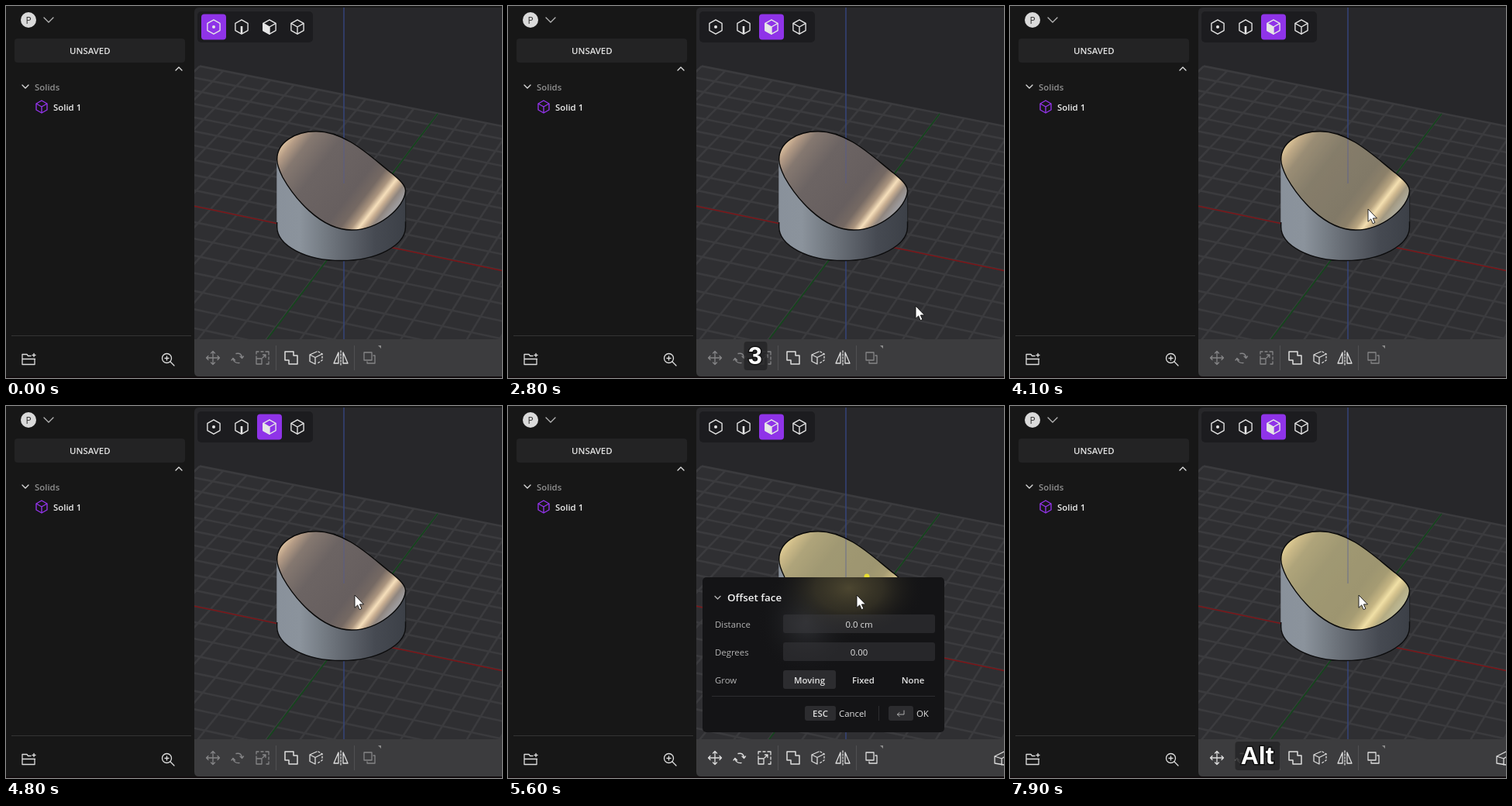
These frames come from a looping animation (640 px wide and 480 px high, 8 s). An HTML page:

```html
<!DOCTYPE html>
<html lang="en">
<head>
<meta charset="utf-8">
<title>Offset face</title>
<style>
html, body { margin: 0; width: 100%; height: 100%; overflow: hidden; background: #171717; }
svg { display: block; width: 640px; height: 480px; }
text { font-family: "Open Sans", "Noto Sans", sans-serif; font-size: 11.4px; fill: #e2e2e2; }
.semi { font-weight: 600; }
.mid { text-anchor: middle; }
.dim { fill: #b4b4b4; }
.line { fill: none; stroke: #dedede; stroke-width: 1.3; stroke-linejoin: round; stroke-linecap: round; }
.key { font: bold 32px "Liberation Sans", Arial, sans-serif; fill: #fff; stroke: #111; stroke-width: 3; paint-order: stroke; }
</style>
</head>
<body>
<svg viewBox="0 0 640 480">
  <defs>
    <clipPath id="view"><path d="M640 2H249Q243 2 243 8V430H640Z"/></clipPath>
    <linearGradient id="side" gradientUnits="userSpaceOnUse" x1="349" x2="516" y1="0" y2="0">
      <stop offset="0" stop-color="#89919b"/><stop offset=".18" stop-color="#8b939c"/>
      <stop offset=".36" stop-color="#757c84"/><stop offset=".58" stop-color="#5b6068"/>
      <stop offset=".76" stop-color="#464a52"/><stop offset="1" stop-color="#3c4047"/>
    </linearGradient>
    <linearGradient id="top" gradientUnits="userSpaceOnUse" x1="349" y1="187" x2="480" y2="288">
      <stop offset="0" stop-color="#e0c4a0"/><stop offset=".06" stop-color="#b59c86"/>
      <stop offset=".15" stop-color="#857870"/><stop offset=".34" stop-color="#6c6463"/>
      <stop offset=".66" stop-color="#675f5f"/><stop offset=".76" stop-color="#756963"/>
      <stop offset=".83" stop-color="#ab957f"/><stop offset=".875" stop-color="#f6dfbb"/>
      <stop offset=".91" stop-color="#c8ae91"/><stop offset=".95" stop-color="#90867f"/>
      <stop offset="1" stop-color="#9c9a9c"/>
    </linearGradient>
    <radialGradient id="warm"><stop offset="0" stop-color="#4c4630"/><stop offset=".45" stop-color="#3a3627" stop-opacity=".75"/><stop offset="1" stop-color="#141416" stop-opacity="0"/></radialGradient>
    <radialGradient id="cool"><stop offset="0" stop-color="#3c3e42" stop-opacity=".7"/><stop offset="1" stop-color="#141416" stop-opacity="0"/></radialGradient>
    <clipPath id="card"><rect x="251" y="221" width="312" height="200" rx="5"/></clipPath>
  </defs>

  <rect width="640" height="480" fill="#171717"/>
  <rect y="478" width="640" height="2" fill="#120c0e"/>

  <!-- sidebar -->
  <circle cx="29" cy="18" r="10" fill="#dadada"/>
  <text class="mid" x="29" y="22.5" style="font-size:12px;fill:#333">P</text>
  <path class="line" stroke-opacity=".8" d="M49 15l6 6 6-6"/>
  <rect x="11" y="42" width="220" height="31" rx="4" fill="#232324"/>
  <text class="semi" x="82" y="62">UNSAVED</text>
  <path class="line" d="M219 83l4-4 4 4"/>
  <path class="line" d="M21 102l4 4 4-4"/>
  <text class="semi" x="37" y="109" style="fill:#919191">Solids</text>
  <g id="solidIcon" transform="translate(46 130)"></g>
  <text class="semi" x="61" y="135" style="fill:#f0f0f0">Solid 1</text>
  <path d="M7 425.5H239" stroke="#343434"/>
  <path class="line" d="M32 451.500H28.500L27 449.500H21V462.500H37V455.500M21 455.500H37.500M34 450.500H38M36 448.500V452.500"/>
  <g class="line"><circle cx="207.500" cy="454.500" r="6"/><path d="M212 459l5 5M205 454.500h5M207.500 452v5"/></g>

  <!-- viewport -->
  <g clip-path="url(#view)">
    <rect x="243" y="2" width="397" height="428" fill="#27272a"/>
    <path id="floor" fill="#2f2f32"/>
    <path id="grid" fill="none" stroke="#3b3b3e" stroke-width="2.600"/>
    <path d="M243 258.300L640 341.400" stroke="#7c1316" stroke-width="1.500"/>
    <path d="M557 139L337 430" stroke="#15451d" stroke-width="1.800"/>
    <path d="M436 2V430" stroke="#36467f" stroke-width="1.400"/>
    <path fill="url(#side)" d="M349.300 198V285A83.200 43.500 0 0 0 515.700 285V239L446 230Z"/>
    <path d="M349.700 279V285A82.900 43.500 0 0 0 515.500 285V278" fill="none" stroke="#0c0c0d" stroke-width="1.400"/>
    <path d="M515.700 240V280" stroke="#17181a" stroke-width=".8"/>
    <path class="face" fill="url(#top)"/>
    <path class="face" id="tint" fill="#e8df88"/>
    <path d="M436 170V229" stroke="#51599a" stroke-width="1.300" opacity=".5"/>
    <path class="face" fill="none" stroke="#080808" stroke-width="1.400"/>
    <circle id="handle" cx="463" cy="220" r="3.500" fill="#e9df32"/>
  </g>
  <rect x="247" y="7" width="149" height="40" rx="5" fill="#1c1c1f"/>
  <rect id="mode" y="10.500" width="32" height="33" rx="4" fill="#8f33e8"/>
  <g id="modes"></g>

  <!-- toolbar -->
  <path d="M243 430H640V478H249Q243 478 243 472Z" fill="#3c3c3e"/>
  <path d="M348.500 438V470M449.500 438V470" stroke="#505052"/>
  <g class="line needs">
    <path d="M267 445.500V462.500M258.500 454H275.500M264.500 448l2.500-2.500 2.500 2.500M264.500 460l2.500 2.500 2.500-2.500M261 451.500l-2.500 2.500 2.500 2.500M273 451.500l2.500 2.500-2.500 2.500"/>
    <path d="M297 448.500Q304 447 304.500 454M302 452l2.500 2.500 2-2.500M301 460.500Q294 461 293 455M291 457l2-2.500 2.500 2.500"/>
    <path d="M323 449V446H326M329 446H332M335 446H339V450M339 453V456M339 459V462H336M323 452V455M323 455H330V462H323ZM331 454l4-4M331.500 450H335V453.500"/>
    <path d="M462 447H472V457H462ZM474 451H476V461H466V459"/>
  </g>
  <path class="line" style="stroke-width:1.500" d="M360 446H371V451H376V462H365V457H360Z"/>
  <path class="line" d="M401 446L392 450V458.500L399 462V453.500L392 450M399 453.500L408 449"/>
  <path class="line" stroke-dasharray="2 2.500" d="M403 446L408 449V457L402 461"/>
  <path class="line" d="M429 447V461H423ZM435 447V461H441Z"/><path class="line" d="M432 445V463" stroke-dasharray="2 2"/>
  <path d="M480 438H484V442Z" fill="#8c8c8c"/>
  <g id="extra" class="line"><path d="M640 446L628 452V461L640 463M628 452L637 455V463M637 455L640 453"/></g>

  <!-- dialog -->
  <g id="dialog">
    <rect x="251" y="221" width="312" height="200" rx="5" fill="#141416"/>
    <g clip-path="url(#card)">
      <ellipse cx="385" cy="278" rx="65" ry="72" fill="url(#cool)"/>
      <ellipse id="glow" cx="440" cy="235" rx="98" ry="66" fill="url(#warm)"/>
    </g>
    <path class="line" d="M267 245.500l3.500 3.500 3.500-3.500" stroke-opacity=".8"/>
    <text class="semi" x="283" y="252" style="font-size:13.400px;fill:#f2f2f2">Offset face</text>
    <g fill="#3a3a3e" fill-opacity=".5">
      <rect x="355" y="269" width="196" height="24" rx="3"/>
      <rect x="355" y="305" width="196" height="24" rx="3"/>
    </g>
    <rect x="355" y="341" width="68" height="24" rx="3" fill="#2c2c2f"/>
    <text class="dim" x="267" y="286">Distance</text><text class="mid" x="453" y="286">0.0 cm</text>
    <text class="dim" x="267" y="322">Degrees</text><text class="mid" x="453" y="322">0.00</text>
    <text class="dim" x="267" y="358">Grow</text>
    <g class="mid semi"><text x="389" y="358">Moving</text><text x="458.500" y="358">Fixed</text><text x="522.500" y="358">None</text></g>
    <path d="M263 374.500H551M478.500 387V406" stroke="#2d2d30"/>
    <rect x="383" y="387" width="40" height="19" rx="3" fill="#2c2c2f"/>
    <rect x="491" y="387" width="32" height="19" rx="3" fill="#2c2c2f"/>
    <text class="mid semi" x="403" y="401">ESC</text><text x="427" y="401">Cancel</text>
    <path class="line" stroke-opacity=".7" style="stroke-width:1" d="M511 393V398H502.500M505 395.500l-2.500 2.500 2.500 2.500"/>
    <text x="527" y="401">OK</text>
  </g>

  <!-- pressed key -->
  <g id="press">
    <rect id="keyBox" y="433" height="37" rx="4" fill="#262627" fill-opacity=".86"/>
    <text id="keyText" class="key mid" x="319" y="462"></text>
  </g>
  <path id="cursor" d="M0 0V16.300L3.700 12.900 6.200 18.700 8.900 17.500 6.400 11.900H11.500Z" fill="#fff" stroke="#111" stroke-width=".9"/>
</svg>
<script>
const $ = id => document.getElementById(id);
const LOOP = 8000;

const FACE = "M349.700 198C349.700 176 373 161.800 400 161.800C440 161.800 473 197 498 216C510 226 515.500 232 515.500 238.500C514 261 480 289 446 289C405 289 371 246 357 221C352 211 349.700 205 349.700 198Z";
document.querySelectorAll(".face").forEach(p => p.setAttribute("d", FACE));

// Floor grid in perspective: u runs along the red axis, v along the green one
function project(u, v) {
  const w = 1 - 0.002 * u + 0.012 * v;
  const x = 436 + (34.8 * u + 13.6 * v) / w;
  const y = 298.4 + (7.27 * u - 17.9 * v) / w;
  return x.toFixed(1) + " " + y.toFixed(1);
}
let grid = "";
for (let i = -10; i <= 10; i++) {
  grid += `M${project(-10, i)}L${project(10, i)}M${project(i, -10)}L${project(i, 10)}`;
}
$("grid").setAttribute("d", grid);
$("floor").setAttribute("d", `M${project(-10, -10)}L${project(-10, 10)}L${project(10, 10)}L${project(10, -10)}Z`);

function cube(r, inner, color) {
  const x = (r * 0.88).toFixed(1), h = r / 2;
  const hex = `M0 ${-r}L${x} ${-h}V${h}L0 ${r}L-${x} ${h}V${-h}Z`;
  const parts = {
    dot: `<circle r="2" fill="${color}" stroke="none"/>`,
    edge: `<path d="M0 -1V${r - 1}" stroke-width="2.6"/>`,
    face: `<path d="M0 0V${r}L-${x} ${h}V${-h}Z" fill="${color}"/><path d="M0 0L${x} ${-h}"/>`,
    solid: `<path d="M-${x} ${-h}L0 0L${x} ${-h}M0 0V${r}"/>`
  };
  return `<g fill="none" stroke="${color}" stroke-width="1.35" stroke-linejoin="round"><path d="${hex}"/>${parts[inner]}</g>`;
}
$("solidIcon").innerHTML = cube(8, "solid", "#9535ee");
$("modes").innerHTML = ["dot", "edge", "face", "solid"]
  .map((kind, i) => `<g transform="translate(${268 + 36 * i} 27)">${cube(9.2, kind, "#e6e6e6")}</g>`).join("");

// Pointer waypoints: time, x, y
const PATH = [
  [800, 517, 466], [1000, 519, 426], [1300, 525, 393], [1500, 526, 387],
  [3500, 526, 387], [3800, 505, 327], [4100, 462, 262], [4300, 450, 244]
];
function pointer(t) {
  const i = PATH.findIndex(p => p[0] > t);
  if (i < 0) return PATH[PATH.length - 1].slice(1);
  const a = PATH[i - 1], b = PATH[i], k = (t - a[0]) / (b[0] - a[0]);
  return [a[1] + (b[1] - a[1]) * k, a[2] + (b[2] - a[2]) * k];
}

const KEYS = [
  { from: 2700, to: 3600, text: "3", width: 30 },
  { from: 6200, to: 7200, text: "Esc", width: 67 },
  { from: 7900, to: 8000, text: "Alt", width: 58 }
];

const show = (id, on) => $(id).setAttribute("visibility", on ? "visible" : "hidden");

function update(time) {
  const t = Math.floor(time / 100) * 100;
  const within = (a, b) => t >= a && t < b;
  const selected = t >= 5000;

  $("mode").setAttribute("x", t < 2800 ? 252 : 324);
  $("tint").setAttribute("opacity", selected ? 0.42 : within(4000, 4800) ? 0.2 : 0);
  document.querySelector(".needs").style.stroke = selected ? "#dedede" : "#858587";
  show("extra", selected);
  show("dialog", within(5100, 6200));
  show("handle", within(5600, 6200));
  $("glow").setAttribute("opacity", t < 5600 ? 0.85 : 1);

  const key = KEYS.find(k => within(k.from, k.to));
  show("press", key);
  if (key) {
    $("keyText").textContent = key.text;
    $("keyBox").setAttribute("x", 319.5 - key.width / 2);
    $("keyBox").setAttribute("width", key.width);
  }

  show("cursor", t >= 800);
  if (t >= 800) {
    const [x, y] = pointer(t);
    $("cursor").setAttribute("transform", `translate(${x.toFixed(1)} ${y.toFixed(1)})`);
  }
}

const start = performance.now();
function frame() {
  update((performance.now() - start) % LOOP);
  requestAnimationFrame(frame);
}
frame();
</script>
</body>
</html>
```
